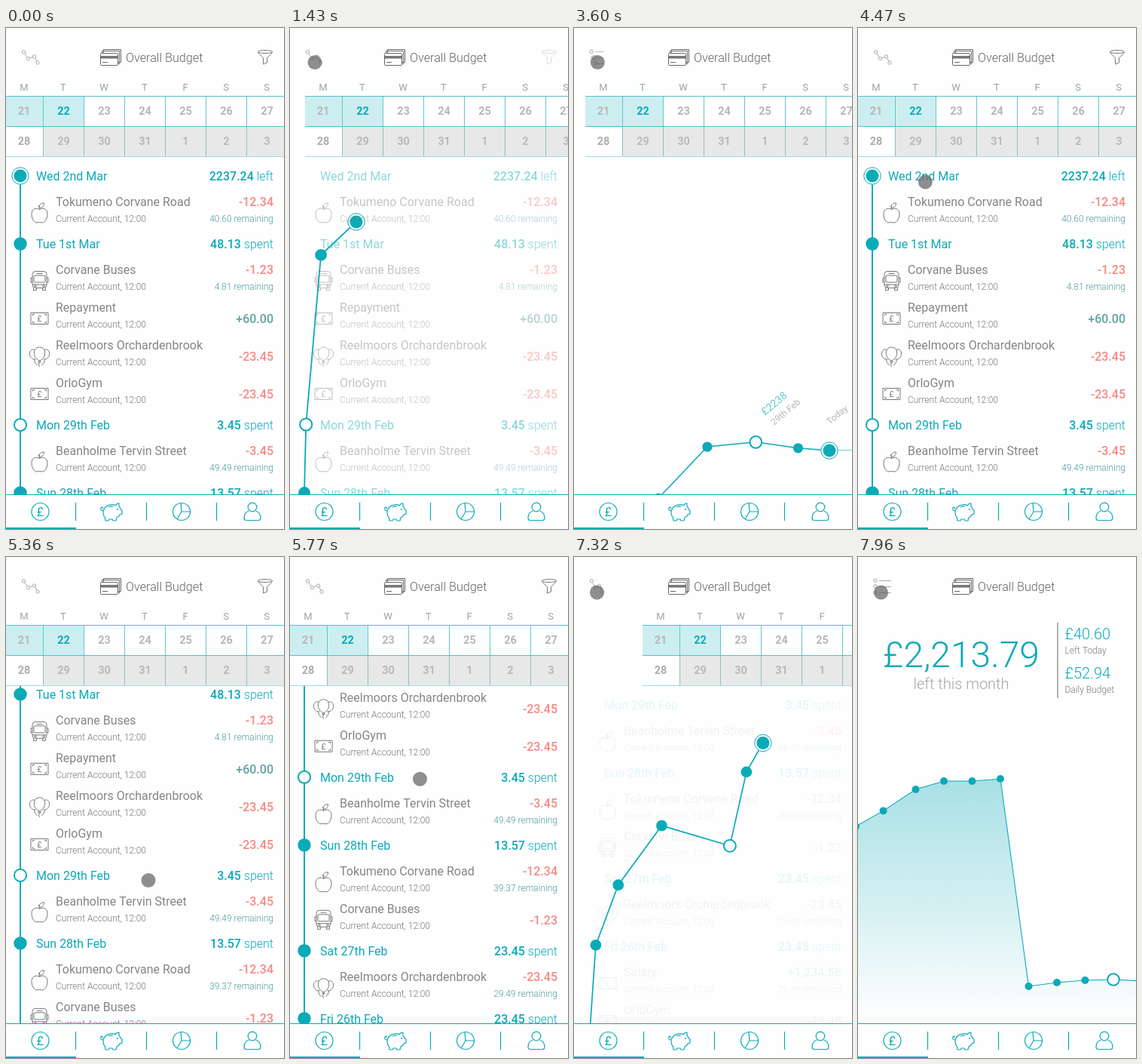
Write an HTML page with a canvas that moves like this. It is 369 px wide and 664 px high and loops after 8 s.

```html
<!DOCTYPE html>
<html lang="en">
<head>
<meta charset="utf-8">
<title>Budget timeline</title>
<style>
html, body { margin: 0; width: 100%; height: 100%; overflow: hidden; background: #fefefe; }
canvas { display: block; width: 369px; height: 664px; }
</style>
</head>
<body>
<canvas id="stage"></canvas>
<script>
const W = 369, H = 664, LOOP = 8000;
const TOP = 171, BOTTOM = 618;
const TEAL = '#0baab7', GRAY = '#858585', RED = '#f68984', GREEN = '#62a3a2', PAPER = '#fefefe';
const canvas = document.getElementById('stage');
const g = canvas.getContext('2d');
const dpr = window.devicePixelRatio || 1;
canvas.width = W * dpr;
canvas.height = H * dpr;

const clamp = v => Math.max(0, Math.min(1, v));
const mix = (a, b, p) => a + (b - a) * p;
const ease = v => { v = clamp(v); return v < .5 ? 2 * v * v : 1 - 2 * (1 - v) ** 2; };
const ramp = (t, from, to) => clamp((t - from) / (to - from));

// Each entry: icon, title, amount, remaining
const noodles = ['apple', 'Tokumeno Corvane Road', '-12.34'];
const bus = ['bus', 'Corvane Buses', '-1.23'];
const cinema = ['balloons', 'Reelmoors Orchardenbrook', '-23.45'];
const gym = ['note', 'OrloGym', '-23.45'];
const coffee = ['apple', 'Beanholme Tervin Street', '-3.45'];
const days = [
  ['Wed 2nd Mar', '2237.24', 'left', [[...noodles, '40.60']]],
  ['Tue 1st Mar', '48.13', 'spent', [[...bus, '4.81'], ['note', 'Repayment', '+60.00'], cinema, gym]],
  ['Mon 29th Feb', '3.45', 'spent', [[...coffee, '49.49']]],
  ['Sun 28th Feb', '13.57', 'spent', [[...noodles, '39.37'], bus]],
  ['Sat 27th Feb', '23.45', 'spent', [[...cinema, '29.49']]],
  ['Fri 26th Feb', '23.45', 'spent', [['note', 'Salary', '+1,234.56', '29.49'], gym]]
];
const chartY = [560, 562, 560, 561, 564, 569, 294, 297, 297, 308, 318, 336];
const listY = [196];
for (let i = 1; i < chartY.length; i++) {
  const rows = days[i - 1] ? days[i - 1][3].length : 2;
  listY.push(listY[i - 1] + 40 + 50 * rows);
}

// Smooth monotone path through [time, ...values] keys
function follow(keys, t, k) {
  const n = keys.length - 1;
  if (t <= keys[0][0]) return keys[0][k];
  if (t >= keys[n][0]) return keys[n][k];
  const slope = i => (keys[i + 1][k] - keys[i][k]) / (keys[i + 1][0] - keys[i][0]);
  const tangent = i => {
    if (i === 0 || i === n || slope(i - 1) * slope(i) <= 0) return 0;
    return (keys[i + 1][k] - keys[i - 1][k]) / (keys[i + 1][0] - keys[i - 1][0]);
  };
  let i = 0;
  while (t > keys[i + 1][0]) i++;
  const [a, b] = [keys[i], keys[i + 1]], d = b[0] - a[0], u = (t - a[0]) / d;
  const s = u * u * (3 - 2 * u);
  return mix(a[k], b[k], s) + d * (tangent(i) * u * (1 - u) ** 2 - tangent(i + 1) * u * u * (1 - u));
}
const scrollKeys = [[4870, 0], [5770, 234], [6230, 322], [6500, 330]];
const cursorKeys = [
  [260, -10, 95], [580, 36.5, 44.5], [910, 36.5, 44.5], [960, 38.5, 46], [1280, 38.5, 46],
  [1500, 31.3, 45.5], [4160, 31.3, 45.5], [4470, 89, 203], [4650, 200, 528], [4870, 200, 528],
  [5770, 172.5, 294.5], [6230, 148.5, 158.5], [6500, 67, 52], [6750, 30.5, 47]
];

function stateAt(t) {
  if (t < 1280) return { mode: 'list', t: 9999, focus: 0, scroll: 0 };
  if (t < 3340) return { mode: 'chart', t: t - 1280, focus: 0, scroll: 0 };
  if (t < 7070) return { mode: 'list', t: t - 3340, focus: 0, scroll: follow(scrollKeys, t, 1) };
  return { mode: 'chart', t: t - 7070, focus: 2, scroll: 330 };
}

function text(str, x, y, size, weight, color, align = 'left') {
  g.font = `${weight} ${size}px Roboto, sans-serif`;
  g.textAlign = align;
  g.fillStyle = color;
  g.fillText(str, x, y);
  return g.measureText(str).width;
}
function line(...p) {
  g.beginPath();
  for (let i = 0; i < p.length; i += 2) g.lineTo(p[i], p[i + 1]);
  g.stroke();
}
function ring(x, y, r) {
  g.beginPath();
  g.arc(x, y, r, 0, 7);
  g.stroke();
}
function disc(x, y, r, color) {
  g.beginPath();
  g.arc(x, y, r, 0, 7);
  g.fillStyle = color;
  g.fill();
}
function box(x, y, w, h, r = 0) {
  g.beginPath();
  g.roundRect(x, y, w, h, r);
  g.stroke();
}
const trace = d => g.stroke(new Path2D(d));
function pen(color, width = 1) {
  g.strokeStyle = color;
  g.lineWidth = width;
}
function layer(alpha, draw, x = 0, y = 0) {
  if (alpha <= 0) return;
  g.save();
  g.globalAlpha *= alpha;
  g.translate(x, y);
  draw();
  g.restore();
}

const icons = {
  apple() {
    trace('M0-4.5C-4-7-10.5-6-10.5 1.5C-10.5 8-7 13-3.5 13Q0 12 3.5 13C7 13 10.5 8 10.5 1.5C10.5-6 4-7 0-4.5');
    trace('M0-4.5Q0-8-1.5-10M0-6.5C-1-11 2-13 6-13C6-9 4-7 0-6.5');
  },
  bus() {
    box(-9.5, -12.5, 19, 22, 4);
    box(-7.5, -7, 15, 9, 1);
    line(-4, -9.5, 4, -9.5);
    line(-9.5, 5, 9.5, 5);
    ring(-5.5, 7, 1.3);
    ring(5.5, 7, 1.3);
    trace('M-9.5-4h-2v6h2M9.5-4h2v6h-2M-8 9.5v3h4v-3M4 9.5v3h4v-3');
  },
  note() {
    box(-11.5, -7.5, 23, 15);
    trace('M-9-3.5V-5.5H-6.5M6.5-5.5H9V-3.5M9 3.5V5.5H6.5M-6.5 5.5H-9V3.5');
    text('£', 0, 4, 10, 400, '#777', 'center');
  },
  balloons() {
    trace('M-5 4C-10 5-14 0-13-5C-12-9-8-10-6-8M5 4C10 5 14 0 13-5C12-9 8-10 6-8');
    trace('M0 6C-5 4-8-1-7-6C-6-14 6-14 7-6C8-1 5 4 0 6L-2 8H2ZM0 8Q-2 11 0 14M-7 4Q-7 9-3 12M7 4Q7 9 3 12');
  }
};

function drawCalendar(x) {
  g.save();
  g.translate(x, 0);
  const left = i => i ? 54 * i - 4.5 : 0;
  ['M', 'T', 'W', 'T', 'F', 'S', 'S'].forEach((s, i) => text(s, i ? 54 * i + 22 : 24, 83, 13, 400, '#a0a0a0', 'center'));
  g.fillStyle = '#cdeef1';
  g.fillRect(0, 90, 103.5, 40);
  g.fillStyle = '#e8e8e8';
  g.fillRect(49.5, 131, W - 49.5, 39);
  for (let i = 0; i < 7; i++) {
    const cx = i ? 54 * i + 22.5 : 24;
    if (i) {
      pen('#64c6ce');
      line(left(i), 90, left(i), 130);
      pen('#8fbfc3');
      line(left(i), 130, left(i), TOP);
    }
    text(21 + i, cx, 115, 14.5, 700, i === 1 ? TEAL : '#b7b7b7', 'center');
    text(i < 4 ? 28 + i : i - 3, cx, 155, 14.5, 700, i ? '#b9b9b9' : '#adadad', 'center');
  }
  pen('#52c1ca');
  line(0, 90.5, W, 90.5);
  line(0, 130.5, W, 130.5);
  pen('#a3dce1');
  line(0, 170.5, W, 170.5);
  g.restore();
}

function drawRows(scroll) {
  days.forEach(([day, sum, word, rows], i) => {
    const y = listY[i] - scroll;
    text(day, 40, y + 6, 16, 400, TEAL);
    const w = text(' ' + word, 355, y + 6, 16, 300, TEAL, 'right');
    text(sum, 355 - w, y + 6, 16, 500, TEAL, 'right');
    rows.forEach(([icon, name, amount, rest], k) => {
      const ry = y + 34 + 50 * k;
      pen('#777');
      layer(1, icons[icon], 44.5, ry + 15);
      text(name, 66, ry + 6, 16, 400, GRAY);
      text('Current Account, 12:00', 66, ry + 27, 12, 300, '#777');
      text(amount, 355, ry + (rest ? 6 : 21), 16, 500, amount[0] === '+' ? GREEN : RED, 'right');
      if (rest) text(rest + ' remaining', 355, ry + 27, 12, 300, '#4f9a98', 'right');
    });
  });
}

function pointsAt(s) {
  return chartY.map((cy, i) => {
    const r = Math.max(0, Math.min(8, i - s.focus));
    const c = s.mode === 'chart'
      ? ease((s.t - 60 * r) / 460)
      : 1 - ease((s.t - Math.max(0, 42 + 60 * (4 - r))) / 460);
    return {
      x: mix(i > 9 ? -200 : 19, 339 - 37.5 * (i - s.focus), c),
      y: mix(listY[i] - s.scroll, cy, c) - 28 * Math.sin(Math.PI * c)
    };
  });
}

function drawTimeline(s, fill) {
  const pts = pointsAt(s);
  const thin = s.mode === 'chart' ? ramp(s.t, 0, 700) : 1 - ramp(s.t, 0, 600);
  layer(fill, () => {
    const grad = g.createLinearGradient(0, 290, 0, 612);
    grad.addColorStop(0, 'rgba(11,170,183,.36)');
    grad.addColorStop(1, 'rgba(11,170,183,0)');
    g.beginPath();
    g.moveTo(pts[0].x, BOTTOM);
    pts.forEach(p => g.lineTo(p.x, p.y));
    g.lineTo(pts[pts.length - 1].x, BOTTOM);
    g.fillStyle = grad;
    g.fill();
  });
  pen(TEAL, mix(2, 1.1, thin));
  line(...pts.flatMap(p => [p.x, p.y]));
  pts.forEach((p, i) => {
    if (i === 0) {
      disc(p.x, p.y, 11.5, PAPER);
      pen(TEAL, 1);
      ring(p.x, p.y, 11.2);
      disc(p.x, p.y, 8.5, TEAL);
    } else if (i === 2) {
      disc(p.x, p.y, 8, PAPER);
      pen(TEAL, 2);
      ring(p.x, p.y, mix(8.1, 7.8, thin));
    } else disc(p.x, p.y, mix(8.7, 5, thin), TEAL);
  });
}

function tilted(str, x, y, size, color) {
  g.save();
  g.translate(x, y);
  g.rotate(-40 * Math.PI / 180);
  text(str, 0, 0, size, 400, color);
  g.restore();
}
function drawLabels() {
  tilted('£2238', 253.5, 514, 14, '#3dbbc6');
  tilted('29th Feb', 265.5, 527, 12, '#a5a5a5');
  tilted('Today', 339.5, 526, 12, '#a5a5a5');
}

function drawPanel() {
  text('£2,213.79', 137, 146, 48, 300, TEAL, 'center');
  text('left this month', 137, 175, 20, 300, '#a5a5a5', 'center');
  pen('#999', 1.5);
  line(265, 87, 265, 187);
  text('£40.60', 274.5, 109, 20, 300, TEAL);
  text('Left Today', 274.5, 128, 12, 300, '#777');
  text('£52.94', 274.5, 161, 20, 300, TEAL);
  text('Daily Budget', 274.5, 180, 12, 300, '#777');
}

function drawHeader(m, funnel) {
  text('Overall Budget', 159, 45, 16.2, 300, '#666');
  pen('#666');
  trace('M129.5 33V28.5H152.5V45.5H149M127.5 33V30.5H150.5V47.5H149');
  box(125.5, 33.5, 23, 16, 1);
  g.fillStyle = '#777';
  g.fillRect(126, 37, 22, 3.5);
  line(128, 45.5, 135, 45.5);

  // Graph icon becomes list icon
  const from = [[23.5, 32], [29.5, 40.5], [37.5, 38], [42, 46]];
  const to = [[23, 31], [23, 39], [23, 39], [23, 47]];
  const dots = from.map((p, i) => [mix(p[0], to[i][0], m), mix(p[1], to[i][1], m)]);
  pen('#aaa');
  layer(1 - m, () => line(...dots.flat()));
  dots.forEach(([x, y]) => {
    disc(x, y, 2.5, PAPER);
    ring(x, y, 2.2);
  });
  layer(m, () => [31.5, 39.5, 47.5].forEach(y => line(28, y, 28 + 16 * m, y)));

  layer(funnel, () => {
    pen('#777');
    g.beginPath();
    g.ellipse(344, 31.5, 9.5, 2, 0, 0, 7);
    g.stroke();
    trace('M334.5 31.5Q335 34 341.5 39.5V48L346.5 46V39.5Q353 34 353.5 31.5');
  });
}

function drawTabs() {
  g.fillStyle = PAPER;
  g.fillRect(0, BOTTOM, W, H - BOTTOM);
  pen(TEAL, 1.2);
  line(0, 618.5, W, 618.5);
  [92.5, 186.5, 279.5].forEach(x => line(x, 629, x, 653));
  g.fillStyle = TEAL;
  g.fillRect(0, 662, 93, 2);
  ring(45.5, 641, 11.5);
  text('£', 45.5, 647, 16, 400, TEAL, 'center');
  layer(1, () => {
    trace('M-8-6C-4-10 2-10 5-8Q7-11 10-11V-7Q12-5 12-3L14-2V3L11 4Q10 7 7 8L6 12H2L1 10H-3L-4 12H-8L-8.5 8C-12 4-12-2-8-6M-11-1Q-15-1-14-5Q-12-7-11.5-4M-4-6Q-1-8 2-6.5');
    disc(8, -3, 1, TEAL);
  }, 140, 641);
  ring(233, 641, 11.5);
  line(232, 629.6, 233, 641, 244.5, 641);
  line(233, 641, 227, 651);
  ring(327, 635, 5.8);
  trace('M322.5 640C318 641.5 316 645 316 649.5Q316 652.5 319 652.5H335Q338 652.5 338 649.5C338 645 336 641.5 331.5 640');
}

function draw(t) {
  const s = stateAt(t), u = s.t, chart = s.mode === 'chart';
  g.setTransform(dpr, 0, 0, dpr, 0, 0);
  g.globalAlpha = 1;
  g.fillStyle = PAPER;
  g.fillRect(0, 0, W, H);

  const label = chart ? ramp(u, 900, 1680) : 1 - ramp(u, 0, 600) ** 2;
  const labelAlpha = chart ? clamp(label * 1.6) : label;

  g.save();
  g.beginPath();
  g.rect(0, TOP, W, BOTTOM - TOP);
  g.clip();
  if (!s.focus) layer(labelAlpha * .7, () => { pen(TEAL, 1); line(339, 559.5, W, 559.5); });
  drawTimeline(s, chart ? ramp(u, 480, 880) : 1 - ramp(u, 0, 200));
  layer(chart ? 1 - ramp(u, 0, 280) : ramp(u, 450, 850), () => drawRows(s.scroll));
  if (!s.focus) layer(labelAlpha, drawLabels, 0, chart ? -20 * (1 - label) : 0);
  g.restore();

  layer(chart ? ramp(u, 450, 800) : 1 - ramp(u, 0, 180), drawPanel);
  const slide = chart ? ramp(u, 0, 400) ** 3 : (1 - ramp(u, 0, 396)) ** 3;
  if (slide < 1) drawCalendar(Math.round(W * slide));
  const morph = ease(u / 700);
  drawHeader(chart ? morph : 1 - morph, chart ? 1 - ramp(u, 0, 200) : ramp(u, 500, 800));
  drawTabs();
  if (t >= 260) disc(follow(cursorKeys, t, 1), follow(cursorKeys, t, 2), 9.5, 'rgba(98,98,98,.72)');
}

const start = performance.now();
function tick() {
  draw((performance.now() - start) % LOOP);
  requestAnimationFrame(tick);
}
tick();
</script>
</body>
</html>
```
